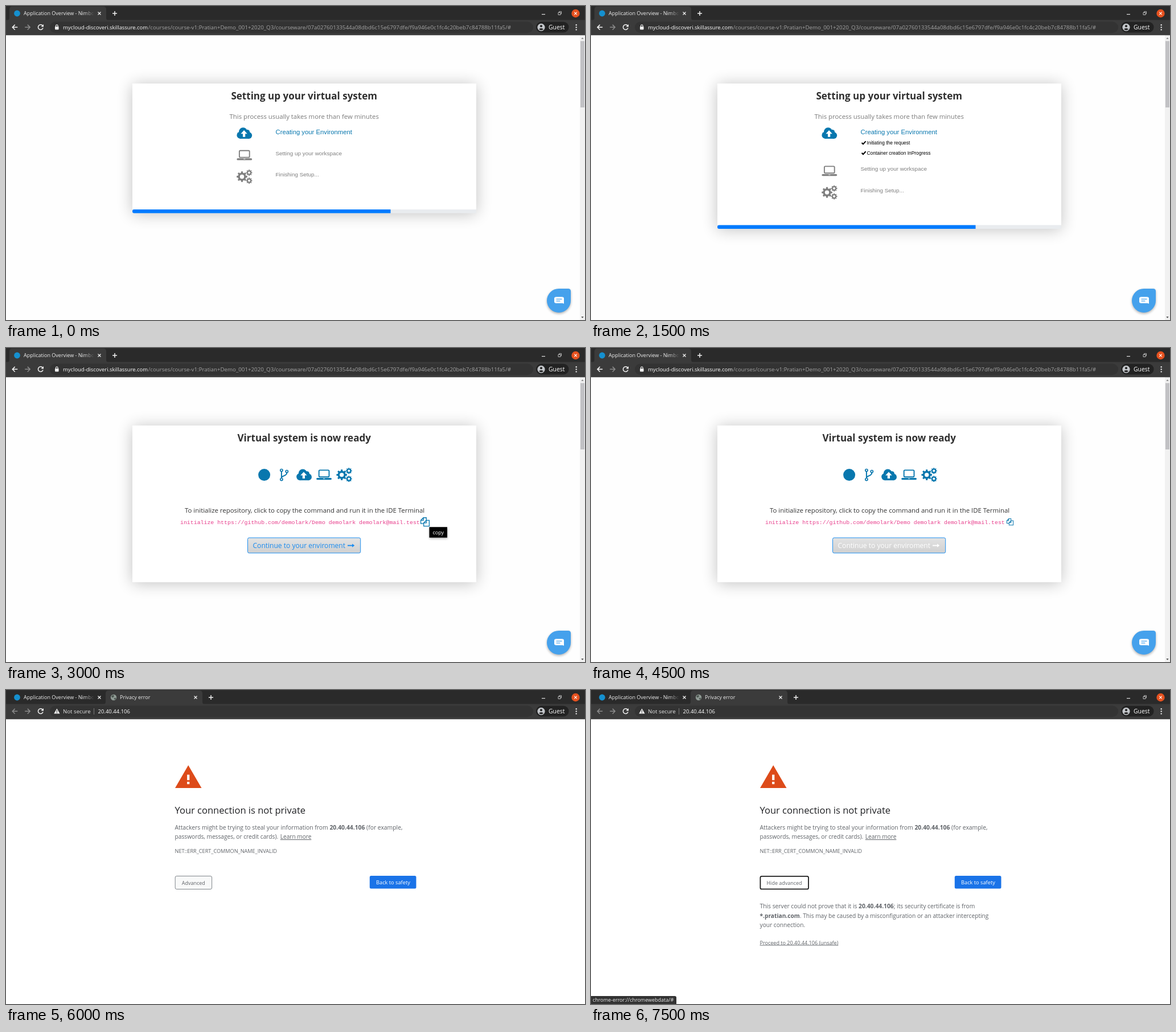
Recreate the animation shown at these times as an HTML page. Size 1017x551 px, loop 8000 ms.

```html
<!DOCTYPE html>
<html lang="en">
<head>
<meta charset="utf-8">
<title>Virtual system setup</title>
<style>
html, body { margin: 0; width: 100%; height: 100%; overflow: hidden; background: #fff; }
svg { display: block; width: 1017px; height: 551px; }
text { font-family: "Open Sans", "Noto Sans", sans-serif; white-space: pre; }
.arial { font-family: "Liberation Sans", Arial, sans-serif; }
.mono { font-family: "Liberation Mono", "Courier New", monospace; }
.b { font-weight: 700; }
.u { text-decoration: underline; }
.mid { text-anchor: middle; }
</style>
</head>
<body>
<script>
const LOOP = 8000;
const BLUE = '#0877ae', GREY = '#7f7f7f', BLACK = '#000', BODY = '#5f6368';
const STRIP = '#2a2a2a', BAR = '#3b3b3b';
const IP = '20.40.44.106';

const rect = (x, y, w, h, fill, more = '') =>
  `<rect x="${x}" y="${y}" width="${w}" height="${h}" fill="${fill}" ${more}/>`;
const text = (x, y, size, fill, str, cls = '') =>
  `<text x="${x}" y="${y}" font-size="${size}" fill="${fill}" class="${cls}">${str}</text>`;
const dot = (x, y, r, fill) => `<circle cx="${x}" cy="${y}" r="${r}" fill="${fill}"/>`;
const path = (d, fill, more = '') => `<path d="${d}" fill="${fill}" ${more}/>`;
const line = (d, color, w, more = '') =>
  path(d, 'none', `stroke="${color}" stroke-width="${w}" ${more}`);
const at = (x, y, inner, scale = 1) =>
  `<g transform="translate(${x} ${y}) scale(${scale})">${inner}</g>`;
const bold = s => `<tspan font-weight="700">${s}</tspan>`;

// Icons, all drawn around their centre
function gear(cx, cy, r, hole, color) {
  const teeth = 8, pts = [];
  for (let i = 0; i < teeth; i++) {
    for (const [shift, k] of [[-.3, .76], [-.2, 1], [.2, 1], [.3, .76]]) {
      const a = (i + shift) / teeth * 2 * Math.PI;
      pts.push((cx + r * k * Math.cos(a)).toFixed(2) + ' ' + (cy + r * k * Math.sin(a)).toFixed(2));
    }
  }
  const ring = `M${cx - hole} ${cy}a${hole} ${hole} 0 1 0 ${2 * hole} 0a${hole} ${hole} 0 1 0 ${-2 * hole} 0Z`;
  return path(`M${pts.join('L')}Z${ring}`, color, 'fill-rule="evenodd"');
}

const cogs = c => gear(-4.3, 0, 9.4, 3.7, c) + gear(8.3, -7, 5.5, 2, c) + gear(8.3, 7, 5.5, 2, c);

const cloud = c =>
  dot(-7.2, 3.4, 6.2, c) + dot(-2.3, -2.6, 7.5, c) + dot(5, -2, 4.4, c) + dot(7.6, 3.8, 5.8, c) +
  rect(-7.2, 0, 15, 9.6, c) + path('M-.7-5.2L5 .9H1.4V6.4H-2.8V.9H-6.4Z', '#fff');

const laptop = c =>
  rect(-8.9, -8.2, 17.8, 11.8, 'none', `rx="1.6" stroke="${c}" stroke-width="1.9"`) +
  rect(-13.4, 5.3, 26.8, 3.3, c, 'rx="1.6"') + rect(-1.6, 6.2, 3.2, .8, '#fff');

const fork = c => [[-4.6, -8], [-4.6, 8], [4.8, -6]].map(([x, y]) =>
  `<circle cx="${x}" cy="${y}" r="2.1" fill="none" stroke="${c}" stroke-width="1.7"/>`).join('') +
  line('M-4.6-6V6M4.8-4C5 2.5-3.6.8-4.6 5', c, 2);

const pages = c => {
  const sheet = 'M-2.8-7.2H2.2V2.8H-7.2V-2.8ZM-2.8-7.2V-2.8H-7.2';
  return line(sheet, c, 1.3) +
    at(5, 4.4, path('M-2.8-7.2H2.2V2.8H-7.2V-2.8Z', '#fff') + line(sheet, c, 1.3));
};

const tick = 'M-3.4.2L-1 2.6L3.6-2.4';
const cross = (x, y, r, c, w) => line(`M${x - r} ${y - r}l${2 * r} ${2 * r}M${x + r} ${y - r}l${-2 * r} ${2 * r}`, c, w);
const arrow = c => line('M4.8 0H-4M.2-4.4L-4.2 0L.2 4.4', c, 1.5);
const globe = dot(189, 13, 5.2, '#8f9a94') + path('M185 11l3-2.5 2 1.5-1 2.5-2.5 1zM189.5 14.5l3-1 .8 1.6-2 2.4z', '#4c5650');

// Browser frame
function frame(tabs, address) {
  const two = tabs === 2, left = two ? 175 : 6, plus = two ? 360 : 191;
  const end = left + 170, dim = '#8b8b8b';
  return rect(0, 0, 1017, 25, STRIP) + rect(0, 24.5, 1017, 26.8, BAR) +
    path(`M${left - 4} 25q4 0 4-4V6q0-5 5-5H${end - 5}q5 0 5 5V21q0 4 4 4Z`, BAR) +
    dot(19.5, 13, 5.4, '#1590cf') +
    text(31, 16.2, 9, '#eee', 'Application Overview - Nimbor') +
    rect(138, 4, 17, 18, `url(#fade${tabs})`) + rect(155, 4, 20, 18, two ? STRIP : BAR) +
    cross(164, 13, 2.5, '#eee', 1.3) +
    line(`M${plus - 4} 13h8M${plus} 9v8`, '#f2f2f2', 1.5) +
    line('M941 14.6h6', '#ddd', 1.2) +
    line('M970 11.5h4v4h-4zM971.5 11v-1.2h4v4h-1', '#ccc', .9) +
    dot(1000.5, 13, 7.2, '#e5511f') + cross(1000.5, 13, 2.3, '#fff', 1.1) +
    at(15.5, 37.3, arrow(two ? dim : '#f4f4f4')) + at(38, 37.3, arrow(dim), -1) +
    line('M64.4 34.6A4.4 4.4 0 1 0 65 38.6', '#f4f4f4', 1.5) + path('M66 32v4.6h-4.6z', '#f4f4f4') +
    rect(77, 27.6, 849, 19.6, '#333', 'rx="9.8"') +
    rect(931, 27.8, 57.5, 18.8, '#222', 'rx="9.4"') +
    dot(940, 37.3, 6.6, '#c3c6ca') + dot(940, 35.2, 2, '#222') + path('M936 40.6q4-3.4 8 0q-4 4-8 0', '#222') +
    text(953, 40.7, 10.4, '#fff', 'Guest') +
    [33.2, 37.4, 41.6].map(y => dot(1001.7, y, 1.2, '#eee')).join('') + address;
}

const courseUrl =
  rect(86, 36, 6.6, 5.4, '#eee', 'rx=".8"') + line('M87.4 36.5V35a1.9 1.9 0 0 1 3.8 0v1.5', '#eee', 1.1) +
  text(100, 40.6, 9.43, '#fff', 'mycloud-discoveri.skillassure.com') +
  text(249.7, 40.6, 9.72, '#a3a3a3', '/courses/course-v1:Pratian+Demo_001+2020_Q3/courseware/07a02760133544a08dbd6c15e6797dfe/f9a946e0c1fc4c20beb7c84788b11fa5/#');

const unsafeUrl =
  path('M89.4 32.4L94.6 41.6H84.2Z', '#eee') + line('M89.4 35.6v2.8M89.4 39.3v1.2', '#333', 1.1) +
  text(100, 40.6, 9.66, '#e4e4e4', 'Not secure') + rect(154, 32, 1, 11, '#777') +
  text(161.5, 40.6, 9.5, '#fff', IP);

const secondTab = title => globe + text(200, 16.2, 9, '#eee', title) + cross(333, 13, 2.5, '#eee', 1.3);

// Course page
const scrollbar = rect(1008, 51, 9, 500, '#f1f1f1') + rect(1009, 61.5, 7, 116.5, '#c1c1c4') +
  path('M1010.3 58h4.4l-2.2-2.8z', '#8a8a8a') + path('M1010.3 545h4.4l-2.2 2.8z', '#505050');

const chatShape = 'M971 496H987.5Q992 496 992 500.5V516.5A21 21 0 1 1 971 496Z';
const chat = path(chatShape, '#000', 'opacity=".3" filter="url(#soft)" transform="translate(0 2)"') +
  path(chatShape, '#45a1ec') + path('M966 510.5H977Q980 510.5 980 513.5V522.6L977.6 521.4H966Q963 521.4 963 518.4V513.5Q963 510.5 966 510.5Z', '#fff') +
  line('M966.5 514.4h10M966.5 517.6h7', '#45a1ec', 1.3);

const card = bottom =>
  rect(222, 138, 604, bottom - 136, '#000', 'opacity=".24" filter="url(#shadow)"') +
  rect(222, 136, 604, bottom - 136, '#fff');

const progress = y => rect(222, y, 604, 6.6, '#e9ecef') +
  path(`M675.5 ${y}V${y + 6.6}H225Q222 ${y + 6.6} 222 ${y + 3.3}T225 ${y}Z`, '#007bff');

const heading = s => text(523.7, 164, 17.05, '#2f2f2f', s, 'b mid');

const coursePage = inner => rect(0, 51, 1017, 500, '#fefefe') + inner + scrollbar + chat + frame(1, courseUrl);

// rows: [icon, icon y, baseline, colour, label, active or done]
function setup(note, cardEnd, rows, extra = '') {
  return coursePage(card(cardEnd + 6) + progress(cardEnd) +
    heading('Setting up your virtual system') +
    text(523.7, 198, 11.35, '#7a7a7a', note, 'mid') +
    rows.map(([icon, y, base, color, label, big]) =>
      at(418.8, y, icon(color)) + text(473.5, base, big ? 11.3 : 9.89, color, label, 'arial')).join('') + extra);
}

const steps = ['Creating your Environment', 'Setting up your workspace', 'Finishing Setup...'];
const slow = 'This process usually takes more than few minutes';
const waiting = shift => [
  [cloud, 223.3, 224.7, BLUE, steps[0], true],
  [laptop, 262 + shift, 261.5 + shift, GREY, steps[1]],
  [cogs, 299.5 + shift, 299 + shift, GREY, steps[2]]
];
const checked = (y, s) => at(479, y - 3, line(tick, BLACK, 2)) + text(484.5, y, 8.44, BLACK, s, 'arial');

function ready(hoverCopy) {
  const label = hoverCopy ? '#1a8cf0' : '#fff';
  const icons = [[488.5, fork], [523.6, cloud], [558.6, laptop], [594, cogs]];
  return coursePage(card(411) + heading('Virtual system is now ready') +
    dot(453.6, 222.6, 10.5, BLUE) + icons.map(([x, f]) => at(x, 222.6, f(BLUE))).join('') +
    text(314, 289, 11.42, '#333', 'To initialize repository, click to copy the command and run it in the IDE Terminal') +
    text(306, 309, 9.9, '#e83e8c', 'initialize https://github.com/demolark/Demo demolark demolark@mail.test', 'mono') +
    at(736, 305.2, pages(BLUE), hoverCopy ? 1.03 : .78) +
    rect(424.5, 333, 198.2, 26.8, 'url(#button)', 'rx="2.5" stroke="#1e8ff0" stroke-width="1"') +
    text(433.5, 350.6, 12.05, label, 'Continue to your enviroment') +
    line('M600 346.6h9', label, 1.9) + path('M608 343.4l4.3 3.2-4.3 3.2z', label) +
    (hoverCopy ? rect(744, 316, 31.5, 18.5, '#000', 'opacity=".3" filter="url(#soft)"') +
      rect(743.5, 314.2, 31.5, 18.5, '#000') + text(759.3, 326.8, 9.1, '#fff', 'copy', 'mid') : ''));
}

// Certificate warning
const errorTabs = title => frame(2, unsafeUrl) + secondTab(title);
const loading = rect(0, 51, 1017, 500, '#fff') + errorTabs(IP);

function warning(open, status) {
  const button = open
    ? rect(297.4, 326.8, 84.6, 22.6, '#fff', 'rx="2.5" stroke="#1c1c1c" stroke-width="1.8"') + text(308.5, 341.5, 8.97, BODY, 'Hide advanced')
    : rect(297.2, 326.5, 64.4, 23, '#f8f9f9', 'rx="2.5" stroke="#80868b" stroke-width="1"') + text(308.7, 341.5, 9, BODY, 'Advanced');
  const details = text(296.5, 383.4, 10.29, BODY, `This server could not prove that it is ${bold(IP)}; its security certificate is from`) +
    text(296.5, 399.8, 10.2, BODY, `${bold('*.pratian.com')}. This may be caused by a misconfiguration or an attacker intercepting`) +
    text(296.5, 416.2, 10.2, BODY, 'your connection.') +
    text(296.5, 446.5, 9.05, BODY, `Proceed to ${IP} (unsafe)`, 'u');
  const bubble = path('M0 537H147Q150 537 150 540V551H0Z', '#333') +
    text(3, 547.4, 8.97, '#eee', 'chrome-error://chromewebdata/#');
  return rect(0, 51, 1017, 500, '#fff') +
    path('M320.2 132L343.5 172H297Z', '#dd4b1a') +
    rect(318.1, 148.6, 4.2, 9.6, '#fff') + rect(318.1, 161, 4.2, 4.2, '#fff') +
    text(296.5, 216.5, 16.55, '#202124', 'Your connection is not private') +
    text(296.5, 244.7, 10.35, BODY, `Attackers might be trying to steal your information from ${bold(IP)} (for example,`) +
    text(296.5, 261.1, 10.2, BODY, 'passwords, messages, or credit cards).') +
    text(481.8, 261.1, 10.1, BODY, 'Learn more', 'u') +
    text(296.5, 286, 9.13, BODY, 'NET::ERR_CERT_COMMON_NAME_INVALID') + button +
    rect(638.8, 326, 81.7, 22.6, '#1a73e8', 'rx="2.5"') + text(650, 340.8, 9.25, '#fff', 'Back to safety') +
    (open ? details : '') + (status ? bubble : '') + errorTabs('Privacy error');
}

const scenes = [
  [0, setup(slow, 357, waiting(0))],
  [750, setup(slow, 384.4, waiting(27.6),
    checked(242.8, 'Initiating the request') + checked(260.6, 'Container creation InProgress'))],
  [2250, setup('Almost Ready', 357.6, [
    [cloud, 223.3, 224.7, BLACK, steps[0], true],
    [laptop, 262, 262.8, BLUE, steps[1], true],
    [cogs, 300.2, 299.7, GREY, steps[2]]])],
  [3000, ready(true)],
  [4500, ready(false)],
  [5250, loading],
  [6000, warning(false, false)],
  [6750, warning(true, false)],
  [7500, warning(true, true)]
];

const fade = (id, color) => `<linearGradient id="${id}"><stop offset="0" stop-color="${color}" stop-opacity="0"/><stop offset="1" stop-color="${color}"/></linearGradient>`;
const defs = `<defs>${fade('fade1', BAR)}${fade('fade2', STRIP)}
<linearGradient id="button" x2="0" y2="1"><stop offset="0" stop-color="#e3e3e3"/><stop offset="1" stop-color="#d0d0d0"/></linearGradient>
<filter id="shadow" x="-20%" y="-40%" width="140%" height="180%"><feGaussianBlur stdDeviation="14"/></filter>
<filter id="soft" x="-50%" y="-50%" width="200%" height="200%"><feGaussianBlur stdDeviation="2"/></filter></defs>`;

document.body.innerHTML = `<svg viewBox="0 0 1017 551">${defs}${scenes.map(([, s]) => `<g class="scene">${s}</g>`).join('')}</svg>`;
const groups = [...document.querySelectorAll('.scene')];

function show(now) {
  const t = now % LOOP;
  const current = scenes.findLastIndex(([start]) => start <= t);
  groups.forEach((g, i) => { g.style.display = i === current ? '' : 'none'; });
}

const begin = performance.now();
function tickFrame() {
  show(performance.now() - begin);
  requestAnimationFrame(tickFrame);
}
tickFrame();
</script>
</body>
</html>
```
